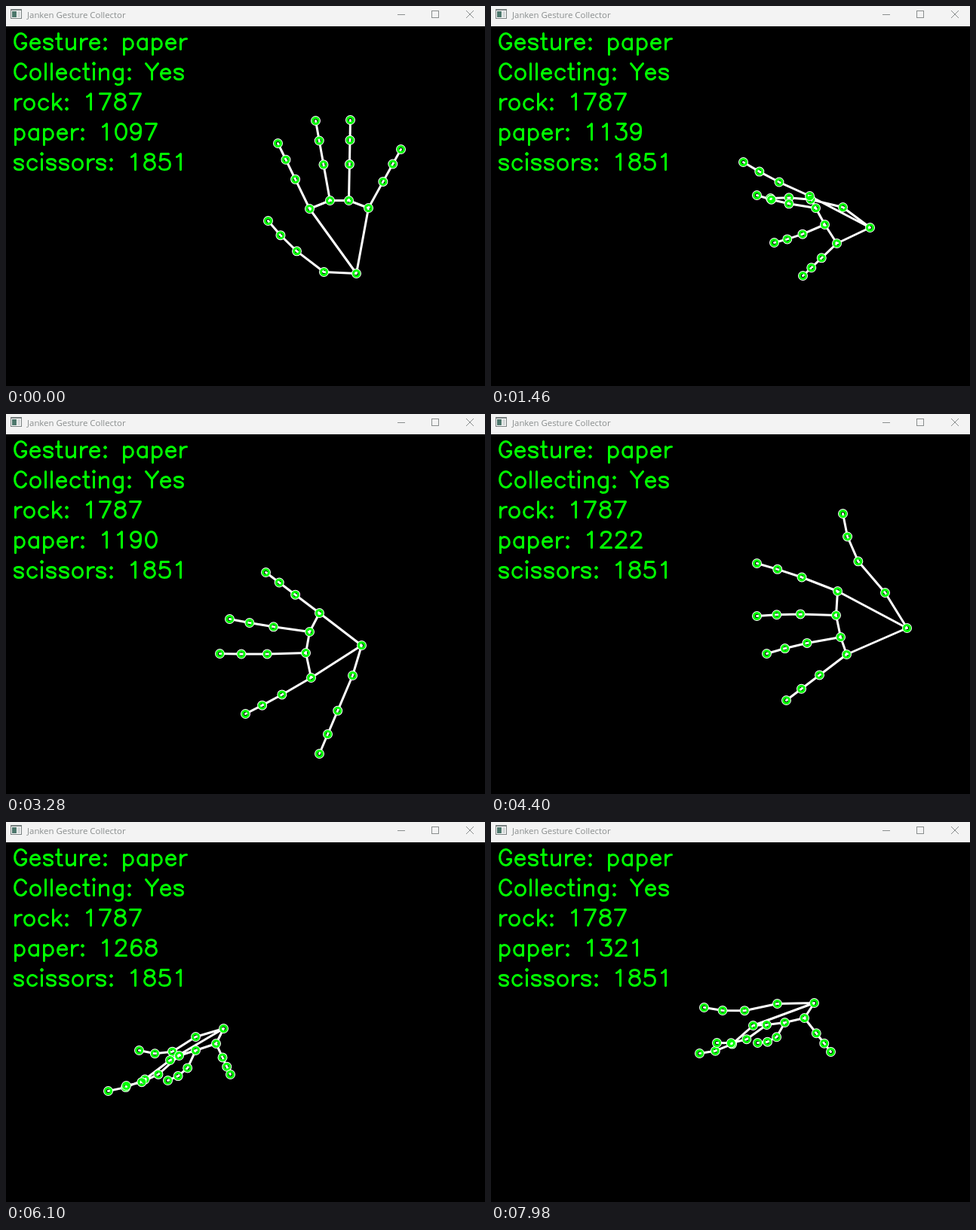
Animation, 635 px wide and 505 px high, one loop 8 s. Source, as an HTML page with a canvas:

```html
<!DOCTYPE html>
<html lang="en">
<head>
<meta charset="utf-8">
<title>Janken Gesture Collector</title>
<style>
  html, body { margin: 0; width: 100%; height: 100%; overflow: hidden; background: #000; }
  canvas { display: block; }
  #hud { position: absolute; left: 10px; top: 28px; margin: 0; color: transparent; font: 29px/40px "DejaVu Sans", sans-serif; }
</style>
</head>
<body>
<canvas id="stage" width="635" height="505"></canvas>
<pre id="hud"></pre>
<script>
const ctx = document.getElementById('stage').getContext('2d');
const hud = document.getElementById('hud');
const W = 635, H = 505, BAR = 27;
const LOOP = 8000, STEP = 70, PEN = 3;
const GREEN = '#00ff00', WHITE = '#ffffff', GREY = '#8a8e8e';

// Single-stroke lettering, y up from the baseline, built from shared parts.
const STEM = 'M4 14V0';
const TALL = 'M4 21V0';
const BOWL = 'M15 11A6.5 7 0 1 1 15 3';
const BELLY = 'Q17 13 17 7Q17 0 9.5 0Q4 0 3 4';
const ROUND = 'M18 16A8 10.5 0 1 1 18 5';
const dot = (x, y) => `M${x - 1} ${y}h2m-1 -1v2`;
const oval = (x, y, rx, ry) =>
  `M${x - rx} ${y}a${rx} ${ry} 0 1 1 ${2 * rx} 0a${rx} ${ry} 0 1 1 ${-2 * rx} 0`;

const SHAPES = {
  ' ': '',
  ':': dot(5, 13) + dot(5, 1),
  C: ROUND,
  G: ROUND + 'V8H13',
  Y: 'M1 21 9 11 17 21M9 11V0',
  a: BOWL + 'M15 14V0',
  c: BOWL,
  e: 'M3 8H15A5.5 6 0 0 1 9.5 14A6.5 7 0 0 1 9.5 0Q13 0 15 3',
  g: BOWL + 'M15 14V-2Q15 -7 10 -7H8L6 -6',
  i: STEM + dot(4, 21),
  k: TALL + 'M14 14 4 4M8 8 15 0',
  l: TALL,
  n: STEM + 'M4 10Q8 14 10.5 14Q15 14 15 10V0',
  o: oval(9.5, 7, 6.5, 7),
  p: 'M4 14V-7M4 11A6.5 7 0 1 0 4 3',
  r: STEM + 'M4 8Q6 14 12 14',
  s: 'M14 11Q13 14 8.5 14Q3 14 3 11Q3 8.6 8.5 7.5Q14 6.5 14 3.5Q14 0 8.5 0Q4 0 3 3',
  t: 'M5 21V4Q5 0 8 0H10M2 14H9',
  0: oval(10, 10.5, 7, 10.5),
  1: 'M6 17 8 18 11 21V0',
  2: 'M4 16Q4 21 10 21Q16 21 16 16Q16 13 13 10L3 0H17',
  3: 'M5 21H16L10 13' + BELLY,
  4: 'M13 0V21L3 7H18',
  5: 'M15 21H5L4 12Q6 14 9.5 14' + BELLY,
  6: 'M16 18Q15 21 11 21Q4 21 4 10V7' + oval(10.5, 6.5, 6.5, 6.5),
  7: 'M3 21H17L7 0',
  8: oval(10, 16.75, 6, 4.25) + oval(10, 6.25, 7, 6.25)
};
const WIDTHS = { il: 8, ':': 10, t: 12, r: 13, ' ': 16, ks: 17, ceY: 18, agnopu: 19, CG: 21 };

function halfTurn(path, w, h) {
  const turned = new Path2D();
  turned.addPath(path, new DOMMatrix([-1, 0, 0, -1, w, h]));
  return turned;
}

const glyphs = {};
for (const ch in SHAPES) glyphs[ch] = new Path2D(SHAPES[ch]);
glyphs.u = halfTurn(glyphs.n, 19, 14);
glyphs[9] = halfTurn(glyphs[6], 20, 21);

function advance(ch) {
  const group = Object.keys(WIDTHS).find(chars => chars.includes(ch));
  return group ? WIDTHS[group] : 20;
}

// Joints from root to tip, bowed sideways by bend.
function finger([x, y, tipX, tipY], bend) {
  const dx = tipX - x, dy = tipY - y, len = Math.hypot(dx, dy);
  return [0, 0.45, 0.75, 1].map(u => {
    const bow = bend * 4 * u * (1 - u) / len;
    return [x + dx * u - dy * bow, y + dy * u + dx * bow];
  });
}

// Thumb to pinky, each as root and tip; curl bows the three long fingers.
function hand(wrist, thumbBend, curl, fingers) {
  const bends = [thumbBend, curl, curl, curl, 0];
  return [wrist, ...fingers.flatMap((f, i) => finger(f, bends[i]))];
}

const open = hand([464, 355], -4, 0, [
  [421, 353, 347, 285], [402, 269, 360, 182], [429, 258, 410, 152], [454, 258, 456, 151], [480, 268, 523, 190]]);
const turned = hand([502, 294], 5, -2, [
  [466, 267, 370, 255], [422, 252, 334, 207], [430, 268, 352, 251], [442, 290, 375, 314], [458, 315, 413, 358]]);
const thumbDown = hand([471, 307], 0, -1, [
  [459, 347, 415, 451], [404, 350, 317, 398], [397, 317, 283, 318], [402, 289, 296, 272], [415, 264, 344, 210]]);
const thumbUp = hand([551, 284], -12, 2, [
  [522, 237, 466, 132], [459, 235, 352, 198], [457, 267, 352, 268], [463, 296, 365, 318], [471, 319, 391, 380]]);
const edgeLow = hand([288, 274], -12, -8, [
  [251, 285, 176, 303], [217, 316, 135, 357], [229, 310, 159, 350], [251, 303, 214, 343], [278, 294, 297, 335]]);
const tilted = hand([399, 301], -3, -1, [
  [377, 267, 380, 181], [430, 191, 483, 109], [453, 202, 530, 121], [469, 220, 549, 150], [478, 245, 566, 216]]);
const edgeHigh = hand([428, 240], -7, -9, [
  [379, 241, 282, 246], [347, 270, 276, 307], [365, 269, 299, 293], [389, 266, 353, 293], [415, 260, 450, 305]]);

const shift = (pose, dx, dy) => pose.map(([x, y]) => [x + dx, y + dy]);

const MOVES = [
  [0, open],
  [12, shift(open, 15, 15)],
  [21, turned],
  [36, shift(open, -8, -72)],
  [47, thumbDown],
  [63, thumbUp],
  [67, shift(thumbUp, 80, 16)],
  [79, shift(thumbUp, -261, 9)],
  [87, edgeLow],
  [96, shift(tilted, -54, -89)],
  [106, tilted],
  [114, edgeHigh]
];

const BONES = [[5, 9], [9, 13], [13, 17], [0, 5], [0, 17], [0, 1]];
for (let root = 1; root <= 17; root += 4)
  for (let j = root; j < root + 3; j++) BONES.push([j, j + 1]);

function handAt(tick) {
  const next = Math.max(1, MOVES.findIndex(([t]) => t >= tick));
  const [t0, a] = MOVES[next - 1], [t1, b] = MOVES[next];
  const f = (tick - t0) / (t1 - t0);
  const u = (f + f * f * (3 - 2 * f)) / 2;
  return a.map(([x, y], i) => [x + (b[i][0] - x) * u, y + (b[i][1] - y) * u]);
}

// Two samples per tick, less one miss every 21 ticks.
function countAt(tick) {
  return 1097 + 2 * tick - Math.max(0, Math.floor((tick - 22) / 21));
}

function ring(x, y, radius, color) {
  ctx.strokeStyle = color;
  ctx.beginPath();
  ctx.arc(x, y, radius, 0, Math.PI * 2);
  ctx.stroke();
}

function drawHand(joints) {
  ctx.save();
  ctx.translate(0.5, 0.5);
  ctx.lineCap = 'round';
  ctx.lineWidth = PEN;
  ctx.strokeStyle = WHITE;
  ctx.beginPath();
  for (const [a, b] of BONES) {
    ctx.moveTo(...joints[a]);
    ctx.lineTo(...joints[b]);
  }
  ctx.stroke();
  for (const [x, y] of joints) {
    ring(x, y, 5, WHITE);
    ring(x, y, 4, GREEN);
  }
  ctx.restore();
}

function write(text, x, baseline) {
  ctx.save();
  ctx.translate(x + 0.5, baseline + 0.5);
  ctx.scale(1, -1);
  ctx.lineWidth = PEN;
  ctx.lineCap = ctx.lineJoin = 'round';
  ctx.strokeStyle = GREEN;
  for (const ch of text) {
    ctx.stroke(glyphs[ch]);
    ctx.translate(advance(ch), 0);
  }
  ctx.restore();
}

function box(x, y, w, h, color) {
  ctx.fillStyle = color;
  ctx.fillRect(x, y, w, h);
}

function drawTitleBar() {
  box(0, 0, W, BAR, '#f3f3f3');
  box(6, 4, 15, 13, '#777f7f');
  box(7, 6, 13, 10, '#fafafa');
  box(8, 7, 6, 8, '#4d776c');
  box(15, 7, 4, 8, '#d5dada');

  ctx.fillStyle = GREY;
  ctx.font = '11.4px "Open Sans", "Noto Sans", sans-serif';
  ctx.fillText('Janken Gesture Collector', 28, 16);

  ctx.strokeStyle = GREY;
  ctx.lineWidth = 1;
  ctx.lineCap = 'butt';
  ctx.strokeRect(564.5, 6.5, 9, 9);
  ctx.stroke(new Path2D('M519 11.5h10M610 6l10 10m0 -10l-10 10'));
}

function draw(ms) {
  const tick = Math.floor((ms % LOOP + 10) / STEP);
  const lines = ['Gesture: paper', 'Collecting: Yes', 'rock: 1787', 'paper: ' + countAt(tick), 'scissors: 1851'];
  box(0, 0, W, H, '#000000');
  drawHand(handAt(tick));
  lines.forEach((line, i) => write(line, 8, 57 + 40 * i));
  drawTitleBar();
  hud.textContent = lines.join('\n');
}

const start = performance.now();
function loop() {
  draw(performance.now() - start);
  requestAnimationFrame(loop);
}
loop();
</script>
</body>
</html>
```
